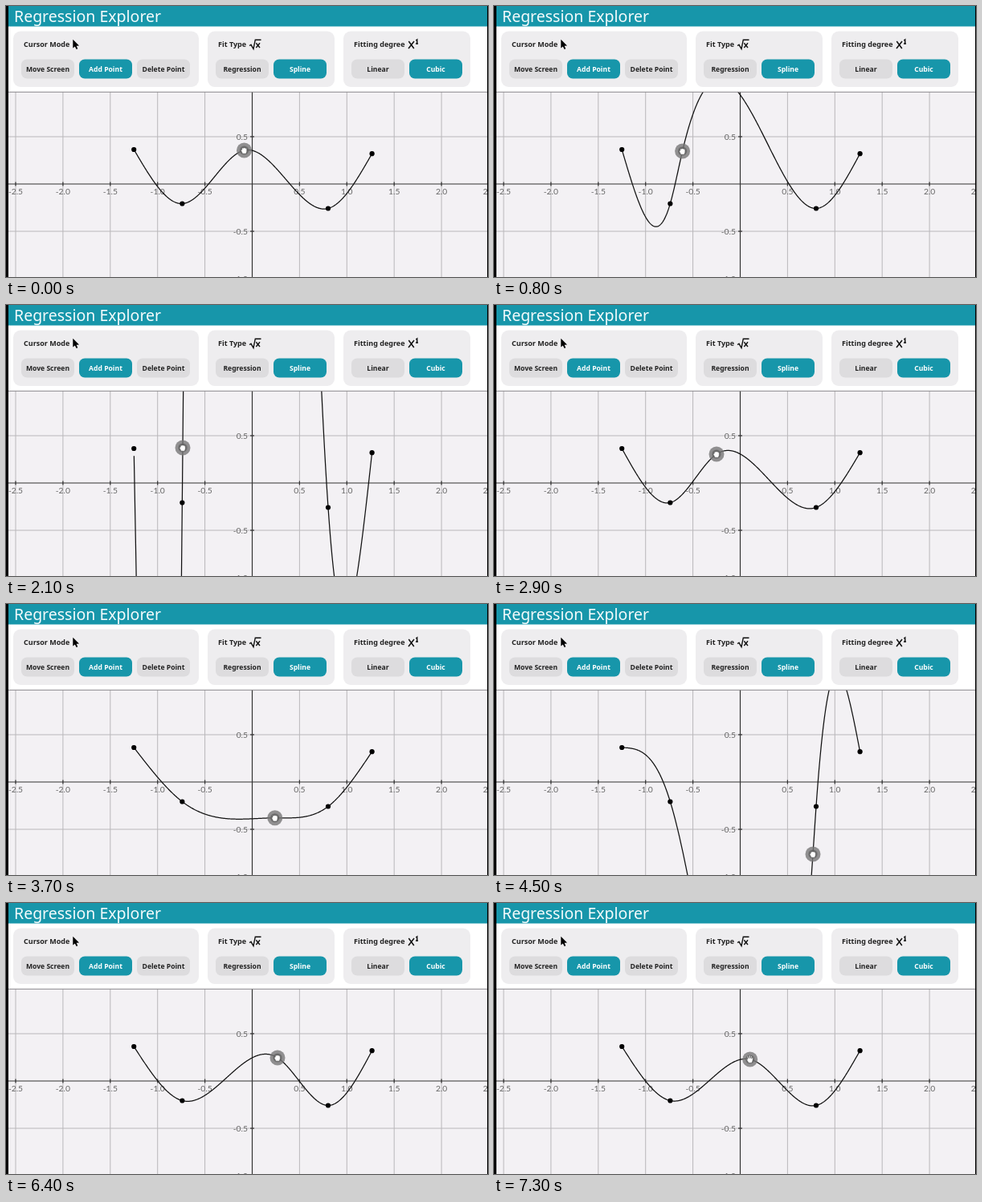
An HTML page that plays this animation: 600x338 px, repeating every 7600 ms.

```html
<!DOCTYPE html>
<html lang="en">
<head>
<meta charset="utf-8">
<title>Regression Explorer</title>
<style>
  html, body { margin: 0; width: 100%; height: 100%; overflow: hidden; background: #fff; }
  svg { display: block; width: 600px; height: 338px; }
  text { font-family: "Noto Sans", sans-serif; }
  .title { font-size: 19.5px; fill: #f4fbfc; }
  .label { font-size: 9px; font-weight: 600; fill: #222; }
  .button { font-size: 8.6px; font-weight: 600; fill: #222; text-anchor: middle; }
  .button.on { fill: #fff; }
  .tick { font-family: Lato, sans-serif; font-size: 10.3px; fill: #666; }
  .grid { stroke: #b9b7ba; }
  .axis { stroke: #333; stroke-width: 1.2; }
  .curve { fill: none; stroke: #111; stroke-width: 1.25; stroke-linejoin: round; }
  .hand { fill: #fff; stroke: #444; stroke-width: .5; stroke-linejoin: round; }
</style>
</head>
<body>
<svg id="stage" viewBox="0 0 600 338"></svg>
<script>
const TEAL = '#1796aa';
const LOOP = 7600, STEP = 100, RELEASE = 7300;
const TOP = 107, ORIGIN = { x: 306.5, y: 222 }, UNIT = 58.9;

// Fixed spline knots; the dragged knot is inserted by its x.
const knots = [[159.2, 179], [219.35, 246.5], [401, 252.5], [455.6, 184.2]];

// Drag path: time, x, y
const dragPath = [
  [0, 296.5, 180], [400, 264, 181], [800, 234.6, 181], [1100, 225, 180],
  [1500, 220.8, 179], [1600, 220.8, 179], [2100, 220, 178], [2400, 240, 182],
  [2900, 277, 186], [3300, 306, 208], [3600, 328, 252], [4000, 355, 311],
  [4500, 397, 312], [5000, 397, 290], [5300, 396, 248], [5600, 393.5, 209],
  [5700, 393, 205], [6000, 371, 193], [6400, 338, 193], [7100, 318.7, 195]
];

const stage = document.getElementById('stage');

function add(name, attrs, parent = stage, content = '') {
  const node = document.createElementNS('http://www.w3.org/2000/svg', name);
  for (const key in attrs) node.setAttribute(key, attrs[key]);
  node.textContent = content;
  parent.appendChild(node);
  return node;
}
const rect = (x, y, width, height, fill, rx = 0) => add('rect', { x, y, width, height, fill, rx });
const line = (x1, y1, x2, y2, cls, parent) => add('line', { x1, y1, x2, y2, class: cls }, parent);
const text = (x, y, cls, content, parent, anchor) =>
  add('text', { x, y, class: cls, ...(anchor && { 'text-anchor': anchor }) }, parent, content);

function drawPanel(x, width, label, buttons) {
  rect(x, 31.5, width, 69.5, '#eeedef', 9);
  text(x + 13, 51, 'label', label);
  buttons.forEach(([name, on], i) => {
    const left = x + 10 + i * 72;
    rect(left, 66.5, 66, 24, on ? TEAL : '#dddcde', 7);
    text(left + 33, 81.6, on ? 'button on' : 'button', name);
  });
}

function drawToolbar() {
  rect(0, 0, 600, 338, '#fff');
  rect(0, 0, 600, 25.5, TEAL);
  text(10, 19.5, 'title', 'Regression Explorer');
  drawPanel(9, 231, 'Cursor Mode', [['Move Screen'], ['Add Point', true], ['Delete Point']]);
  drawPanel(251, 158, 'Fit Type', [['Regression'], ['Spline', true]]);
  drawPanel(420, 158, 'Fitting degree', [['Linear'], ['Cubic', true]]);
  add('path', { d: 'M83.3 41.8V52.6L85.8 50.4L87.6 54L89.3 53.2L87.6 49.7L91 49.4Z', fill: '#000' });
  add('path', {
    d: 'M303 49.5L305 48.3L308 53.5L310.3 42.2H317.5M311.3 46.3L316 52M316 46.3L311.3 52',
    fill: 'none', stroke: '#111', 'stroke-width': 1.4
  });
  add('path', {
    d: 'M501.3 44L507.8 53M508 44L501 53M510.2 43L511.7 42V47M510 47H513',
    fill: 'none', stroke: '#111', 'stroke-width': 1.5
  });
}

function drawGraph() {
  rect(0, TOP, 600, 231, '#f3f1f4');
  const clip = add('clipPath', { id: 'plot' });
  add('rect', { x: 3, y: TOP, width: 596, height: 231 }, clip);
  const graph = add('g', { 'clip-path': 'url(#plot)' });
  for (let i = -5; i <= 5; i++) {
    const x = ORIGIN.x + i * UNIT;
    if (i) line(x, TOP, x, 338, 'grid', graph);
  }
  for (let i = -2; i <= 1; i++) {
    const y = ORIGIN.y - i * 59;
    if (i) line(3, y, 599, y, 'grid', graph);
  }
  line(3, ORIGIN.y, 599, ORIGIN.y, 'axis', graph);
  line(ORIGIN.x, TOP, ORIGIN.x, 338, 'axis', graph);
  for (let i = -5; i <= 5; i++) {
    if (!i) continue;
    const value = (i / 2).toFixed(1), x = ORIGIN.x + i * UNIT, y = ORIGIN.y - i * 59;
    line(x, 219.5, x, 224.5, 'axis', graph);
    text(x, 234.7, 'tick', value, graph, 'middle');
    if (Math.abs(i) > 2 || i === 2) continue;
    line(304, y, 309, y, 'axis', graph);
    text(301, y + 3.6, 'tick', value, graph, 'end');
  }
  line(3, TOP + .3, 599, TOP + .3, 'grid').style.stroke = '#8b898c';
  return graph;
}

// Natural cubic spline: second derivatives by the Thomas algorithm.
function curvature(p) {
  const n = p.length, m = Array(n).fill(0), c = [0], d = [0];
  for (let i = 1; i < n - 1; i++) {
    const h0 = p[i][0] - p[i - 1][0], h1 = p[i + 1][0] - p[i][0];
    const bend = 6 * ((p[i + 1][1] - p[i][1]) / h1 - (p[i][1] - p[i - 1][1]) / h0);
    const pivot = 2 * (h0 + h1) - h0 * c[i - 1];
    c[i] = h1 / pivot;
    d[i] = (bend - h0 * d[i - 1]) / pivot;
  }
  for (let i = n - 2; i > 0; i--) m[i] = d[i] - c[i] * m[i + 1];
  return m;
}

function splinePath(p) {
  const m = curvature(p), out = [];
  for (let i = 0; i < p.length - 1; i++) {
    const [x0, y0] = p[i], [x1, y1] = p[i + 1], h = x1 - x0;
    const count = Math.max(4, Math.ceil(h * 2));
    for (let k = 0; k <= count; k++) {
      const u = i || k ? k / count : .17 / h, v = 1 - u;
      const y = v * y0 + u * y1 + h * h / 6 * ((v ** 3 - v) * m[i] + (u ** 3 - u) * m[i + 1]);
      out.push((x0 + u * h).toFixed(2) + ' ' + y.toFixed(2));
    }
  }
  return 'M' + out.join('L');
}

function dragAt(t) {
  const next = dragPath.findIndex(row => row[0] > t);
  if (next < 0) return dragPath[dragPath.length - 1].slice(1);
  const a = dragPath[next - 1], b = dragPath[next], u = (t - a[0]) / (b[0] - a[0]);
  return [a[1] + u * (b[1] - a[1]), a[2] + u * (b[2] - a[2])];
}

drawToolbar();
const graph = drawGraph();
const curve = add('path', { class: 'curve' }, graph);
for (const [cx, cy] of knots) add('circle', { cx, cy, r: 3.1, fill: '#000' }, graph);

const cursor = add('g', {}, graph);
add('circle', { r: 9.5, fill: '#777', 'fill-opacity': .8 }, cursor);
add('circle', { r: 5.6, fill: '#626262', 'fill-opacity': .75 }, cursor);
const closedHand = add('path', {
  class: 'hand',
  d: 'M-4 .2Q-4-1-2.8-.8V-2.3Q-2-3.6-1.2-2.8Q-.3-3.8.6-2.9Q1.6-3.5 2.1-2.4Q3.3-2.6 3.3-1.2V1.3L2.3 4.2H-2Z'
}, cursor);
const openHand = add('path', {
  class: 'hand',
  d: 'M-4.6-.2Q-4-1.2-2.9.2L-3.5-3.5Q-3-4.7-2.2-3.6L-1.5-1.2L-1.2-4.7Q-.4-5.6.2-4.6L.4-1.3L1.3-4.4Q2.2-5 2.4-3.9L2-.8L3.3-2.7Q4.3-3 4-1.9L3.2 2.1L2 4.4H-1.7Z'
}, cursor);

rect(0, 0, 3, 338, '#000');
rect(599, 0, 1, 338, '#000');

function render(now) {
  const t = Math.floor(now % LOOP / STEP) * STEP;
  const drag = dragAt(t);
  curve.setAttribute('d', splinePath([...knots, drag].sort((a, b) => a[0] - b[0])));
  cursor.setAttribute('transform', `translate(${drag})`);
  closedHand.style.display = t < RELEASE ? '' : 'none';
  openHand.style.display = t < RELEASE ? 'none' : '';
}

const start = performance.now();
function tick() {
  render(performance.now() - start);
  requestAnimationFrame(tick);
}
tick();
</script>
</body>
</html>
```
